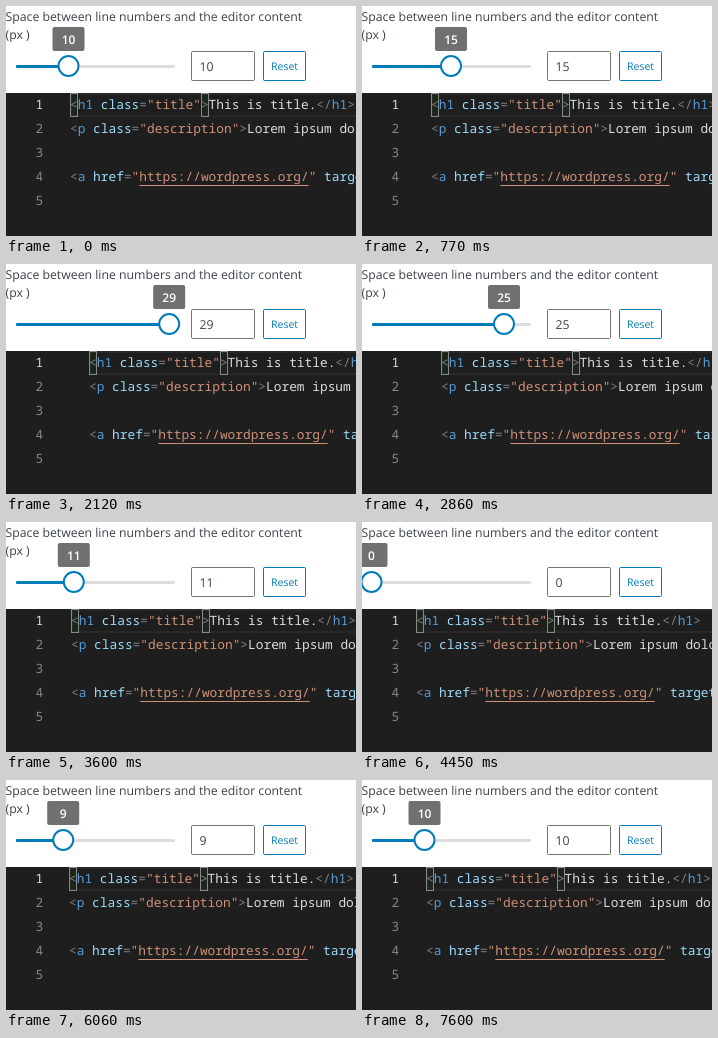
Animation, 350 px wide and 230 px high, one loop 7650 ms. Source, as an HTML page:

```html
<!DOCTYPE html>
<html lang="en">
<head>
<meta charset="utf-8">
<title>Line number spacing</title>
<style>
  html, body { margin: 0; width: 100%; height: 100%; overflow: hidden; background: #fff; }
  svg { display: block; width: 350px; height: 230px; }
  text { text-rendering: geometricPrecision; white-space: pre; }
  .ui { font: 12.28px "Open Sans", "Noto Sans", sans-serif; fill: #3c434a; }
  .code { font: 12.83px "Noto Sans Mono", "DejaVu Sans Mono", monospace; fill: #dcdcdc; }
  .num { fill: #858585; }
  .p { fill: #808080; }
  .t { fill: #569cd6; }
  .a { fill: #9cdcfe; }
  .s { fill: #ce9178; }
  .match { fill: #006400; fill-opacity: .1; stroke: #888; }
</style>
</head>
<body>
<svg viewBox="0 0 350 230">
  <g class="ui">
    <text x="-.5" y="14.5">Space between line numbers and the editor content</text>
    <text x="-.5" y="33">(px )</text>
    <rect x="185.5" y="45.5" width="63" height="29" rx="1" fill="#fff" stroke="#757575"/>
    <text id="field" x="193.5" y="65"></text>
    <rect x="257.5" y="45.5" width="42" height="29" rx="1" fill="#fff" stroke="#007cba"/>
    <text x="265" y="64" style="font-size:10.5px;fill:#007cba">Reset</text>
  </g>

  <rect x="10" y="59" width="159" height="3" rx="1" fill="#ddd"/>
  <rect id="fill" x="10" y="59" height="3" rx="1" fill="#007cba"/>
  <g id="thumb">
    <circle cy="60" r="10" fill="#fff" stroke="#007cba" stroke-width="2"/>
    <rect x="-16" y="21" width="32" height="24" rx="2" fill="#707070"/>
    <text id="tip" class="ui" y="37.5" text-anchor="middle" style="font-size:12px;font-weight:600;fill:#fff"></text>
  </g>

  <rect y="87" width="350" height="143" fill="#1e1e1e"/>
  <g id="numbers" class="code"></g>
  <g id="code" class="code">
    <rect x="1" y="88" width="400" height="22" fill="none" stroke="#282828" stroke-width="2"/>
    <rect class="match" x=".5" y="87.5" width="7" height="23"/>
    <rect class="match" x="131.5" y="87.5" width="7" height="23"/>
    <text y="103"><tspan class="p">&lt;</tspan><tspan class="t">h1</tspan> <tspan class="a">class</tspan><tspan class="p">=</tspan><tspan class="s">"title"</tspan><tspan class="p">&gt;</tspan>This is title.<tspan class="p">&lt;/</tspan><tspan class="t">h1</tspan><tspan class="p">&gt;</tspan></text>
    <text y="127"><tspan class="p">&lt;</tspan><tspan class="t">p</tspan> <tspan class="a">class</tspan><tspan class="p">=</tspan><tspan class="s">"description"</tspan><tspan class="p">&gt;</tspan>Lorem ipsum dolor sit amet</text>
    <text y="175"><tspan class="p">&lt;</tspan><tspan class="t">a</tspan> <tspan class="a">href</tspan><tspan class="p">=</tspan><tspan class="s">"https://wordpress.org/"</tspan> <tspan class="a">target</tspan><tspan class="p">=</tspan><tspan class="s">"_blank"</tspan></text>
    <rect class="s" x="69.3" y="179" width="169.4" height="1"/>
  </g>
</svg>
<script>
const $ = id => document.getElementById(id);
const LOOP = 7650, FIRST = 10;

// Each drag moves the slider steadily by some distance.
const drags = [
  { from: 30, to: 480, by: 4 },
  { from: 690, to: 1870, by: 13 },
  { from: 2020, to: 2120, by: 2 },
  { from: 2620, to: 3800, by: -22 },
  { from: 3880, to: 4450, by: -7 },
  { from: 5180, to: 6060, by: 9 },
  { from: 6590, to: 6860, by: -5 },
  { from: 7320, to: 7600, by: 6 }
];

const progress = (time, { from, to }) => Math.min(1, Math.max(0, (time - from) / (to - from)));
const valueAt = time =>
  Math.round(drags.reduce((sum, drag) => sum + drag.by * progress(time, drag), FIRST));

for (let n = 1; n <= 5; n++) {
  $('numbers').innerHTML += `<text class="${n > 1 ? 'num' : ''}" x="29.5" y="${79 + 24 * n}">${n}</text>`;
}

function draw(value) {
  const offset = 5.3 * value;
  $('field').textContent = $('tip').textContent = value;
  $('fill').setAttribute('width', offset);
  $('thumb').setAttribute('transform', `translate(${9.5 + offset})`);
  $('code').setAttribute('transform', `translate(${54 + value})`);
}

const start = performance.now();
function frame() {
  draw(valueAt((performance.now() - start) % LOOP));
  requestAnimationFrame(frame);
}
frame();
</script>
</body>
</html>
```
